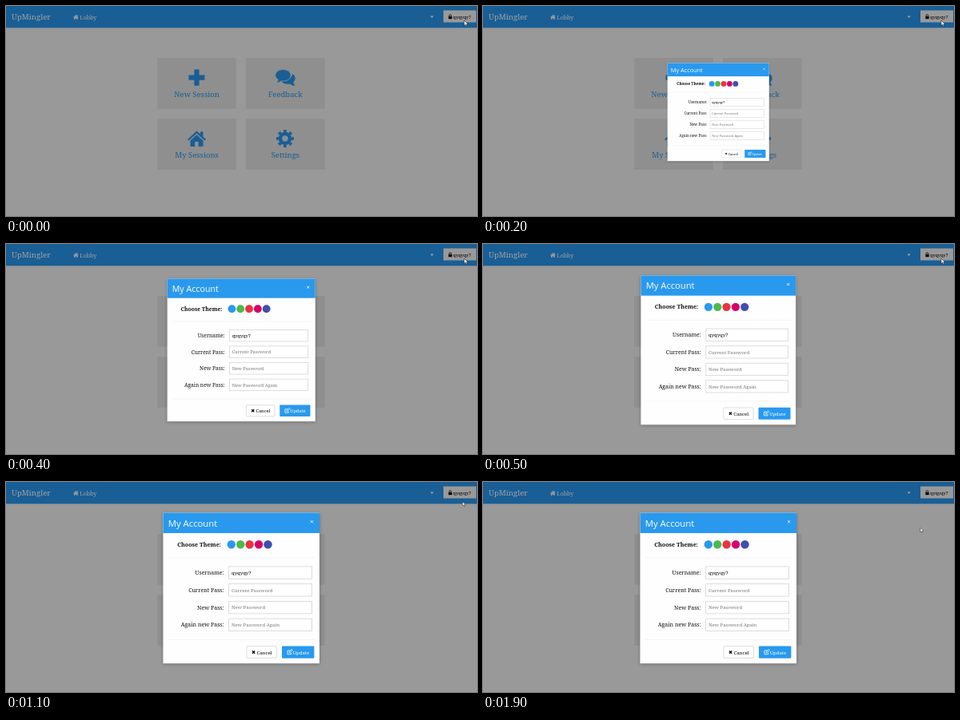
Recreate the animation shown at these times as an HTML page. Size 589 px wide and 263 px high, loop 2000 ms.

```html
<!DOCTYPE html>
<html lang="en">
<head>
<meta charset="utf-8">
<title>Account dialog</title>
<style>
  html, body { margin: 0; width: 100%; height: 100%; overflow: hidden; background: #999; }
  svg { display: block; width: 100vw; height: 100vh; }
  text { font-family: "Noto Serif", serif; }
  .blue { fill: #195e95; }
  .pale { fill: #a3a3a3; }
  .tile { fill: #8f8f8f; }
  .caption { font-size: 9.5px; text-anchor: middle; }
  .label { font-size: 7px; text-anchor: end; fill: #111; }
  .small { font-size: 6px; }
  .hint { fill: #777; }
  .field { fill: #fff; stroke: #d4d4d4; stroke-width: .8; }
  .rule { stroke: #e6e6e6; stroke-width: .7; stroke-dasharray: 1 1; }
</style>
</head>
<body>
<svg viewBox="0 0 589 263" preserveAspectRatio="none">
  <defs>
    <path id="home" d="M-11.5 1 0-9.5 4.5-5.4V-8.5H8v6.3L11.5 1 10 2.6 0-6.4-10 2.6ZM-8 2.4 0-4.8 8 2.4V10H2.2V4H-2.2V10H-8Z"/>
    <filter id="shadow" x="-10%" y="-10%" width="120%" height="120%">
      <feDropShadow dx="0" dy="1" stdDeviation="2" flood-opacity=".3"/>
    </filter>
  </defs>

  <rect width="589" height="263" fill="#999"/>
  <rect class="blue" width="589" height="27.3"/>
  <text class="pale" x="7" y="17" font-size="9.6">UpMingler</text>
  <use class="pale" href="#home" transform="translate(87.4 13.8) scale(.29)"/>
  <text class="pale" x="92.3" y="16.7" font-size="7">Lobby</text>
  <path class="pale" d="M530.5 12.6h4.4l-2.2 2.3Z"/>
  <rect x="547" y="5.5" width="41" height="15" fill="#999"/>
  <path d="M553.4 13h4.2v3.2h-4.2Z"/>
  <path d="M554.2 13v-1a1.3 1.3 0 0 1 2.6 0v1" fill="none" stroke="#000" stroke-width=".8"/>
  <text x="559" y="15.7" font-size="5.5">qyqyqy7</text>

  <g id="tiles"></g>
  <g class="blue">
    <path d="M235.4 79.5h6.2v7h6.9v6.2h-6.9v7h-6.2v-7h-6.9v-6.2h6.9Z"/>
    <use href="#home" transform="translate(238.5 166)"/>
    <path d="M346 91.5c5.5 2.2 11.5-.5 12.2-6.5 3.8 2.2 5 6.8 1.2 10.2.3 2 1.2 3.4 2.4 4.8-2.7 0-4.9-.8-6.7-2.5-5 1-9.3-.8-11-3.8Z"/>
    <path d="M346.5 79.6c5.6 0 9.7 3.2 9.7 7.2s-4.1 7.2-9.7 7.2l-2-.2c-2 1.6-4.2 2.3-6.7 2.3 1.3-1 2.2-2.3 2.4-4-2.2-1.400-3.400-3.200-3.400-5.300 0-4 4.100-7.200 9.700-7.200Z" stroke="#8f8f8f" stroke-width=".9"/>
  </g>
  <g transform="translate(349 166)" fill="none" stroke="#195e95">
    <circle r="6" stroke-width="4.600"/>
    <circle r="9.400" stroke-width="3.200" pathLength="16" stroke-dasharray="1 1" stroke-dashoffset=".5"/>
  </g>

  <g id="dialog">
    <rect x="196.500" y="38.500" width="195.500" height="188.600" fill="#fefefe" filter="url(#shadow)"/>
    <rect x="196.500" y="38.500" width="195.500" height="25.500" fill="#2999ee"/>
    <text x="202.800" y="55.600" font-size="11.300" fill="#fff" style="font-family:'Open Sans',sans-serif">My Account</text>
    <path d="m381 48.200 3 3m0-3-3 3" stroke="#fff" stroke-width=".9"/>
    <text class="label" x="269" y="81" style="font-size:7.200px;font-weight:bold">Choose Theme:</text>
    <g id="themes"></g>
    <path class="rule" d="M203 95H386M203 197.500H386"/>
    <g id="fields"></g>
    <rect class="field" x="300.900" y="205.700" width="37.500" height="14.800" rx="1"/>
    <path d="m308 211.500 3.200 3.200m0-3.200-3.200 3.200" stroke="#000" stroke-width="1.300"/>
    <text class="small" x="313.500" y="215.500">Cancel</text>
    <rect x="345" y="205.500" width="40.400" height="15.200" rx="1" fill="#2999ee"/>
    <path d="M355.500 211h-3.500v4.700h4.700v-2M354 213.800l.3-1.300 3-3 1 1-3 3Z" fill="none" stroke="#fff" stroke-width=".8"/>
    <text class="small" x="358.800" y="215.500" fill="#fff">Update</text>
  </g>

  <path id="cursor" d="M0 0V6.500L1.600 5.200 2.700 7.600 3.800 7.100 2.700 4.800H4.700Z" fill="#fff" stroke="#222" stroke-width=".6"/>
</svg>
<script>
const byId = id => document.getElementById(id);
const fill = (id, items, draw) => byId(id).innerHTML = items.map(draw).join("");

fill("tiles", ["New Session", "Feedback", "My Sessions", "Settings"], (name, i) => {
  const x = 189.3 + 110.8 * (i % 2), y = 65 + 76.2 * (i >> 1);
  return `<rect class="tile" x="${x}" y="${y}" width="98.600" height="63.700"/>
    <text class="blue caption" x="${x + 49.3}" y="${y + 48.5}">${name}</text>`;
});

fill("themes", ["#2999ee", "#4fb84c", "#e8343f", "#d6006c", "#3f4fb0"], (color, i) =>
  `<circle cx="${281.8 + 11.42 * i}" cy="78.300" r="5.200" fill="${color}"/>`);

const fields = [
  ["Username:", "qyqyqy7"],
  ["Current Pass:", "Current Password"],
  ["New Pass:", "New Password"],
  ["Again new Pass:", "New Password Again"]
];
fill("fields", fields, ([label, value], i) => {
  const y = 113.6 + 21.75 * i;
  return `<text class="label" x="272.500" y="${y + 2.6}">${label}</text>
    <rect class="field" x="278.600" y="${y - 7.7}" width="103.800" height="15.400"/>
    <text class="small ${i ? "hint" : ""}" x="282" y="${y + 2.3}">${value}</text>`;
});

const LOOP = 2000, STEP = 100, CENTER = [294.2, 132.8];
// Pointer stops: time, x, y
const pointerPath = [[0, 573, 18], [1000, 573, 18], [1400, 565, 44.5], [1800, 547, 57.5], [LOOP, 547, 57.5]];
const clamp = v => Math.min(1, Math.max(0, v));

function pointerAt(t) {
  const next = pointerPath.findIndex(stop => stop[0] > t);
  const [t0, x0, y0] = pointerPath[next - 1], [t1, x1, y1] = pointerPath[next];
  const k = (t - t0) / (t1 - t0);
  return [x0 + (x1 - x0) * k, y0 + (y1 - y0) * k];
}

function render(now) {
  const t = Math.floor(now % LOOP / STEP) * STEP;
  const scale = 1 - (1 - clamp((t - 20) / 610)) ** 3;
  const [cx, cy] = CENTER;
  byId("dialog").setAttribute("transform",
    `translate(${cx} ${cy}) scale(${scale}) translate(${-cx} ${-cy})`);
  byId("dialog").style.display = scale > 0 ? "" : "none";
  const size = t > 1000 ? .8 : 1;
  byId("cursor").setAttribute("transform", `translate(${pointerAt(t)}) scale(${size})`);
}

const start = performance.now();
function loop() {
  render(performance.now() - start);
  requestAnimationFrame(loop);
}
loop();
</script>
</body>
</html>
```
